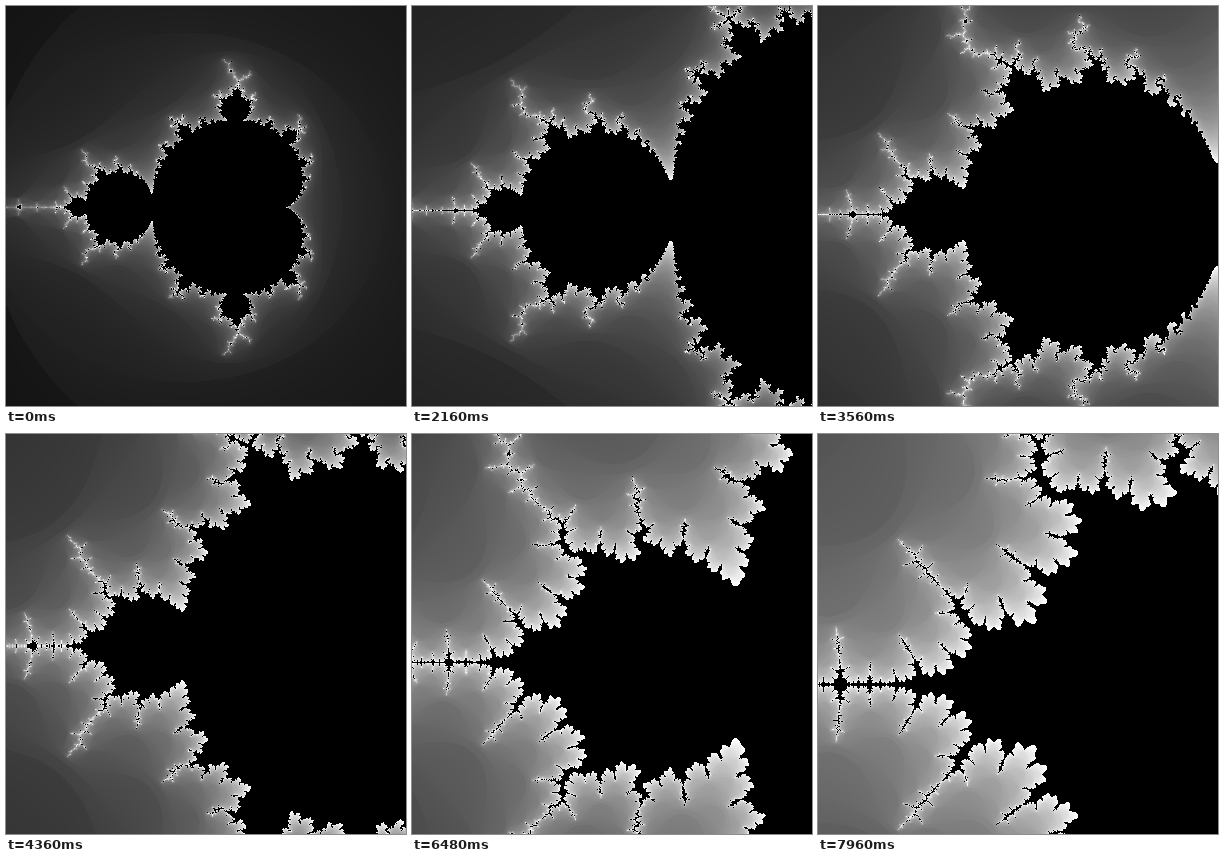
Write an HTML page with a canvas that moves like this. It is 400 px wide and 400 px high and loops after 8000 ms.

```html
<!DOCTYPE html>
<html lang="en">
<head>
<meta charset="utf-8">
<title>Mandelbrot zoom</title>
<style>
  html, body { margin: 0; width: 100%; height: 100%; overflow: hidden; background: #000; }
  canvas { display: block; width: 400px; height: 400px; }
</style>
</head>
<body>
<canvas id="view" width="400" height="400"></canvas>
<script>
const SIZE = 400, LOOP = 8000, STEP = 40, MAX_ITER = 30;
const START_SCALE = 132, SHRINK = 0.985, GAMMA = 0.9;
// The zoom keeps this point of the plane at a fixed pixel.
const target = { re: -1.4347, im: 0.0194, x: 56, y: 198.2 };

const ctx = document.getElementById('view').getContext('2d');
const image = ctx.createImageData(SIZE, SIZE);
const pixels = new Uint32Array(image.data.buffer);

function shade(re, im) {
  let x = 0, y = 0, xx = 0, yy = 0, n = 0;
  while (xx + yy <= 4 && n < MAX_ITER) {
    y = 2 * x * y + im;
    x = xx - yy + re;
    xx = x * x;
    yy = y * y;
    n++;
  }
  if (n === MAX_ITER) return 0;
  const smooth = n + 1 - Math.log(Math.log2(xx + yy) / 2);
  const level = Math.max(0, Math.min(1, smooth / MAX_ITER));
  return Math.round(255 * level ** GAMMA);
}

function draw(step) {
  const scale = START_SCALE / SHRINK ** step;
  let i = 0;
  for (let py = 0; py < SIZE; py++) {
    const im = target.im - (py - target.y) / scale;
    for (let px = 0; px < SIZE; px++) {
      const re = target.re + (px - target.x) / scale;
      pixels[i++] = 0xff000000 | shade(re, im) * 0x010101;
    }
  }
  ctx.putImageData(image, 0, 0);
}

let shown = -1;
const start = performance.now();

function tick() {
  const step = Math.floor(((performance.now() - start) % LOOP) / STEP);
  if (step !== shown) draw(shown = step);
  requestAnimationFrame(tick);
}

tick();
</script>
</body>
</html>
```
